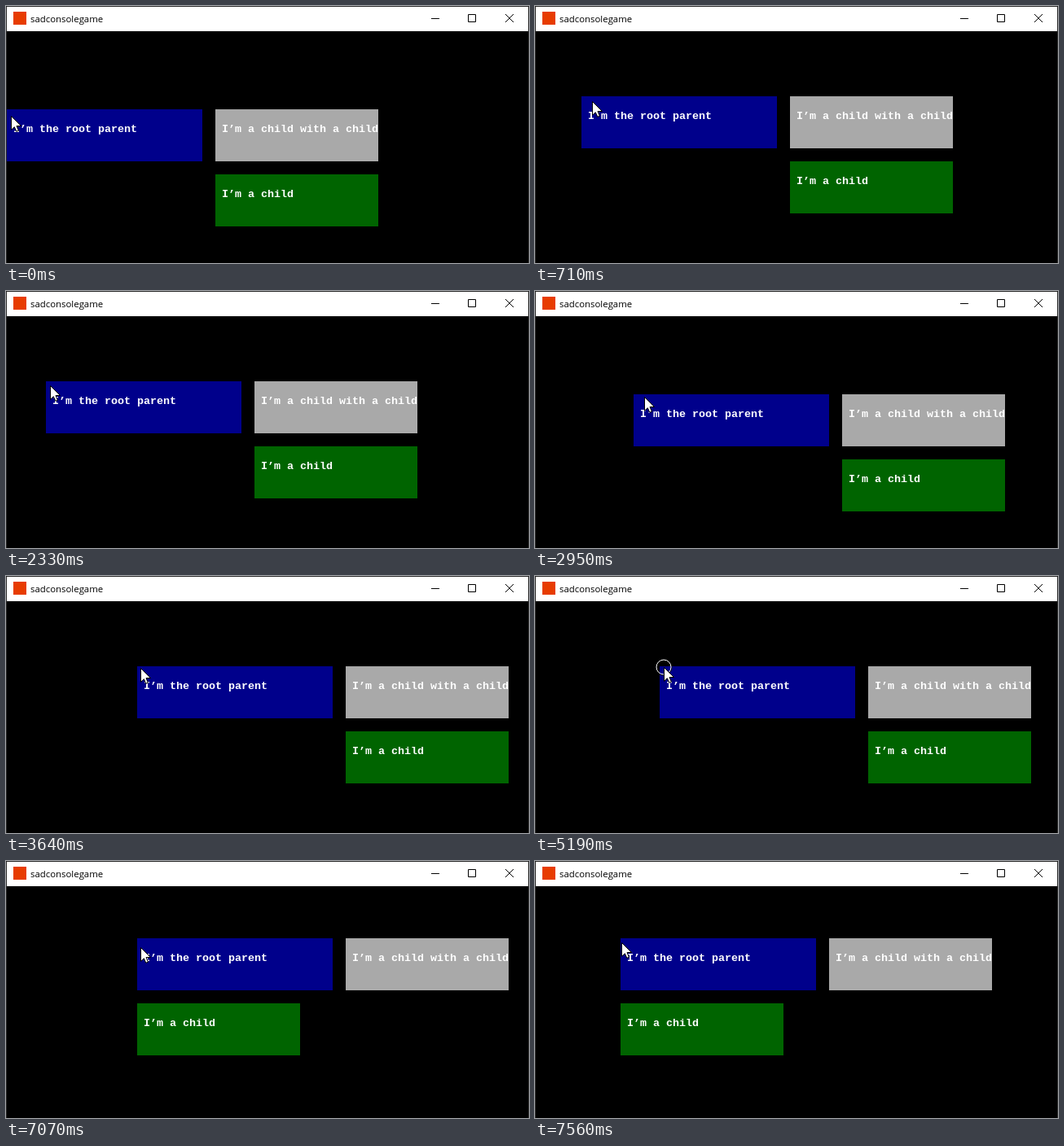
Recreate the animation shown at these times as an HTML page. Size 642 by 316 pixels, loop 8630 ms.

```html
<!DOCTYPE html>
<html lang="en">
<head>
<meta charset="utf-8">
<title>sadconsolegame</title>
<style>
  html, body { margin: 0; width: 100%; height: 100%; overflow: hidden; background: #000; }
  svg { display: block; width: 642px; height: 316px; }
  .title { font: 11.4px "Open Sans", "Noto Sans", sans-serif; }
  .panel text { font: bold 13.333px "Liberation Mono", monospace; fill: #fff; }
  .icons { fill: none; stroke: #000; }
</style>
</head>
<body>
<svg viewBox="0 0 642 316">
  <rect width="642" height="316"/>
  <path d="M.5 316V.5H641.5V316" fill="none" stroke="#2b2b2b"/>
  <rect x="1" y="1" width="640" height="30" fill="#fff"/>
  <rect x="9" y="7" width="16" height="16" fill="#e73c00"/>
  <text class="title" x="30" y="20">sadconsolegame</text>
  <g class="icons">
    <path d="M522 15.5H532M567.5 10.5H576.5V19.5H567.5Z"/>
    <path d="M613 10L623 20M623 10L613 20"/>
  </g>

  <g id="root" class="panel">
    <rect width="240" height="64" fill="#00008b"/>
    <text x="8" y="28">I’m the root parent</text>
    <g transform="translate(256)">
      <rect width="200" height="64" fill="#a9a9a9"/>
      <text x="8" y="28">I’m a child with a child</text>
    </g>
    <g id="child">
      <rect width="200" height="64" fill="#006400"/>
      <text x="8" y="28">I’m a child</text>
    </g>
  </g>

  <g id="cursor">
    <g id="click" fill="none">
      <circle r="10" stroke="#000"/>
      <circle r="9" stroke="#fff"/>
    </g>
    <path d="M.5 .5V17.3L4.3 13.7L6.8 19.3L9.4 18.2L7 12.5H12.5Z" fill="#fff" stroke="#000"/>
  </g>
</svg>

<script>
const LOOP = 8630;
const DRAG_LAG = 36;
const CELL = { width: 8, height: 16, left: 1, top: 31 };
const CLICK = { down: 5190, swap: 5240, up: 5300 };

// Turning points and rests of the pointer.
const stops = [
  { t: 160, x: 6, y: 135 },
  { t: 1230, x: 145, y: 81 },
  { t: 1350, x: 150, y: 66 },
  { t: 1980, x: 60, y: 78 },
  { t: 2330, x: 54, y: 116 },
  { t: 2700, x: 95, y: 150 },
  { t: 3120, x: 148, y: 119 },
  { t: 3350, x: 148, y: 119 },
  { t: 3500, x: 172, y: 115 },
  { t: 3640, x: 165, y: 113 },
  { t: 4080, x: 165, y: 113 },
  { t: 4260, x: 158, y: 112 },
  { t: 5930, x: 158, y: 112 },
  { t: 6300, x: 117, y: 114 },
  { t: 6600, x: 75, y: 84 },
  { t: 6820, x: 115, y: 66 },
  { t: 6970, x: 171, y: 78 },
  { t: 7070, x: 165, y: 106 },
  { t: 7200, x: 140, y: 118 },
  { t: 7560, x: 106, y: 100 }
];

const clamp = (value, low, high) => Math.min(high, Math.max(low, value));
const slope = (a, b, axis) => (b[axis] - a[axis]) / (b.t - a.t);

// Harmonic mean of the neighbouring slopes; zero at turning points, so nothing overshoots.
function tangent(i, axis) {
  if (i === 0 || i === stops.length - 1) return 0;
  const before = slope(stops[i - 1], stops[i], axis);
  const after = slope(stops[i], stops[i + 1], axis);
  return before * after > 0 ? 2 * before * after / (before + after) : 0;
}

// Cubic Hermite curve through the stops.
function pointer(axis, time) {
  const t = clamp(time, stops[0].t, stops.at(-1).t);
  const i = Math.max(1, stops.findIndex(stop => stop.t >= t));
  const a = stops[i - 1], b = stops[i];
  const span = b.t - a.t;
  const u = (t - a.t) / span, v = 1 - u;
  return a[axis] + (b[axis] - a[axis]) * u * u * (3 - 2 * u)
    + span * u * v * (tangent(i - 1, axis) * v - tangent(i, axis) * u);
}

const snap = (value, origin, size) => origin + Math.floor((value - origin) / size) * size;

const [root, child, cursor, click] =
  ["root", "child", "cursor", "click"].map(id => document.getElementById(id));
const place = (element, x, y) => element.setAttribute("transform", `translate(${x} ${y})`);

function draw(time) {
  const dragged = time - DRAG_LAG;
  place(root,
    snap(pointer("x", dragged), CELL.left, CELL.width),
    snap(pointer("y", dragged), CELL.top, CELL.height));
  place(child, time < CLICK.swap ? 256 : 0, 80);
  place(cursor, Math.round(pointer("x", time)), Math.round(pointer("y", time)));
  click.setAttribute("visibility",
    time >= CLICK.down && time < CLICK.up ? "visible" : "hidden");
}

const start = performance.now();
function tick() {
  draw((performance.now() - start) % LOOP);
  requestAnimationFrame(tick);
}
tick();
</script>
</body>
</html>
```
